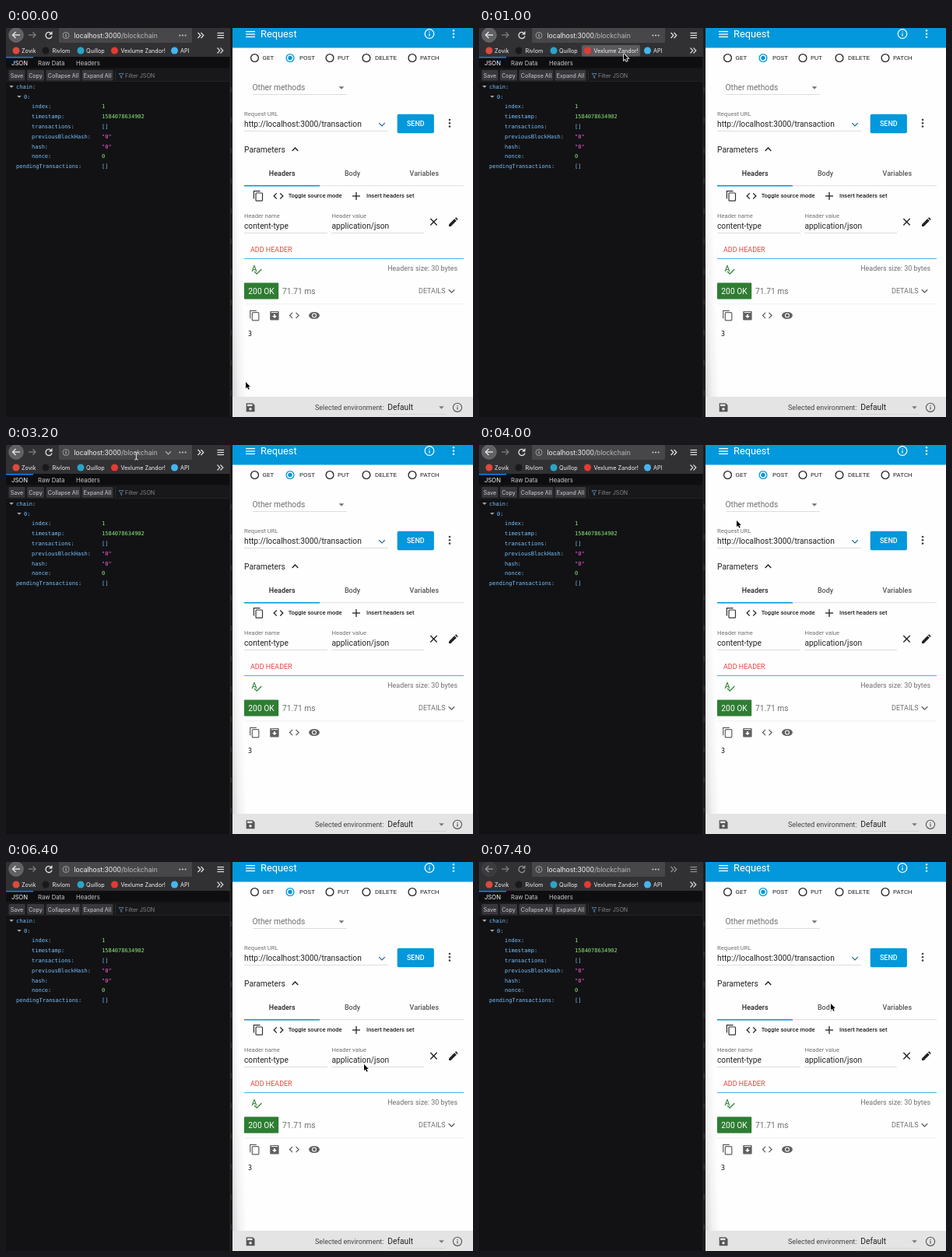
Animation of 600x500 px, one loop 8 s. Source, as an HTML page with a canvas:

```html
<!DOCTYPE html>
<html lang="en">
<head>
<meta charset="utf-8">
<title>Blockchain request</title>
<style>
html, body { margin: 0; width: 100%; height: 100%; overflow: hidden; background: #fff; }
canvas { display: block; width: 600px; height: 500px; }
</style>
</head>
<body>
<canvas id="stage" width="600" height="500"></canvas>
<script>
const ctx = document.getElementById('stage').getContext('2d');
const LOOP = 8000, STEP = 200, FOCUS_SWITCH = 7400;
const UI = 'Inter, sans-serif', APP = 'Roboto, sans-serif', MONO = '"DejaVu Sans Mono", monospace';
const BLUE = '#0298db', INK = '#222222', GREY = '#707070';

// Pointer path: time, x, y
const PATH = [
  [0, 308, 455], [1000, 186, 33], [1400, 180, 26], [2200, 165, 15], [3600, 168, 14],
  [4000, 331, 97], [4800, 470, 140], [5400, 489, 140.5], [6000, 492, 140.5],
  [6400, 460, 260], [6800, 458, 298], [7200, 452, 183], [7400, 452, 182]
];

function rect(x, y, w, h, color, r = 0) {
  ctx.fillStyle = color;
  ctx.beginPath();
  ctx.roundRect(x, y, w, h, r);
  ctx.fill();
}

function frame(x, y, w, h, color, lw = 1.2, r = 1) {
  ctx.strokeStyle = color;
  ctx.lineWidth = lw;
  ctx.beginPath();
  ctx.roundRect(x, y, w, h, r);
  ctx.stroke();
}

function trace(points) {
  ctx.beginPath();
  points.forEach(([x, y], i) => i ? ctx.lineTo(x, y) : ctx.moveTo(x, y));
}

function line(points, color, lw = 1.2) {
  trace(points);
  ctx.strokeStyle = color;
  ctx.lineWidth = lw;
  ctx.stroke();
}

function shape(points, color) {
  trace(points);
  ctx.closePath();
  ctx.fillStyle = color;
  ctx.fill();
}

function disc(x, y, r, color) {
  ctx.fillStyle = color;
  ctx.beginPath();
  ctx.arc(x, y, r, 0, 7);
  ctx.fill();
}

function ring(x, y, r, color, lw = 1.2, from = 0, to = 2 * Math.PI) {
  ctx.strokeStyle = color;
  ctx.lineWidth = lw;
  ctx.beginPath();
  ctx.arc(x, y, r, from, to);
  ctx.stroke();
}

function text(str, x, y, size, color, family = APP, weight = 400, align = 'left') {
  ctx.font = `${weight} ${size}px ${family}`;
  ctx.textAlign = align;
  ctx.fillStyle = color;
  ctx.fillText(str, x, y);
}

const chevron = (x, y, w, h, color, lw) => line([[x - w, y - h], [x, y + h], [x + w, y - h]], color, lw);
const triangle = (x, y, color, s = 3.3) => shape([[x - s, y - s / 2], [x + s, y - s / 2], [x, y + s / 2]], color);

function dots(x, y, dx, dy, r, color) {
  for (let i = -1; i <= 1; i++) disc(x + i * dx, y + i * dy, r, color);
}

function bars(x, y, w, gap, color, lw) {
  for (let i = -1; i <= 1; i++) line([[x, y + i * gap], [x + w, y + i * gap]], color, lw);
}

function doubleChevron(x, y, color) {
  for (const dx of [-3.5, 0.5]) line([[x + dx, y - 3.5], [x + dx + 3.3, y], [x + dx, y + 3.5]], color, 1.2);
}

function infoIcon(x, y, r, color, lw) {
  ring(x, y, r, color, lw);
  rect(x - 0.6, y - r * 0.1, 1.2, r * 0.6, color);
  rect(x - 0.6, y - r * 0.5, 1.2, 1.2, color);
}

function copyIcon(x, y, color) {
  frame(x - 3, y - 4, 8.5, 10.2, color);
  line([[x - 5.6, y + 3.5], [x - 5.6, y - 6.4], [x + 2.5, y - 6.4]], color);
}

function codeIcon(x, y, color) {
  for (const s of [-1, 1]) line([[x + s * 2.2, y - 3.6], [x + s * 5.8, y], [x + s * 2.2, y + 3.6]], color, 1.3);
}

function drawToolbar(focused, overUrl, overBookmark) {
  const icon = focused ? '#e4e4e6' : '#929295';
  rect(0, 0, 288, 37, '#313134');
  disc(13, 9, 9.3, focused ? '#616164' : '#3b3b3e');
  ring(13, 9, 9.3, focused ? '#77777a' : '#4a4a4d', 0.7);
  line([[18, 9], [8.5, 9]], icon, 1.4);
  line([[12.5, 5], [8.5, 9], [12.5, 13]], icon, 1.4);
  line([[29, 9], [38, 9]], '#838386');
  line([[34.5, 5.5], [38, 9], [34.5, 12.5]], '#838386');
  ring(55, 9.5, 4, icon, 1.3, 0.2, 5.3);
  shape([[59.5, 4], [59.5, 8.5], [55, 8.5]], icon);

  rect(68, -3, 171, 22, '#474749', 2);
  infoIcon(77, 9.5, 4, '#b4b4b7', 0.8);
  text('localhost:3000', 87.5, 12.6, 8.55, '#f5f5f6', UI);
  const hostWidth = ctx.measureText('localhost:3000').width;
  text('/blockchain', 87.5 + hostWidth, 12.6, 8.55, '#bcbcbf', UI);
  if (overUrl) chevron(208.5, 10, 3.5, 1.8, '#b8b8bb', 1.2);
  dots(227, 9.5, 3.6, 0, 1.1, '#c4c4c6');
  doubleChevron(250, 9.5, icon);
  bars(271.5, 9.5, 8.5, 3, icon, 1.2);

  if (overBookmark) rect(132, 22, 75, 14.5, '#5b5b5e', 2);
  [
    ['Zovik', 13, 20, '#dc4a3d'], ['Rivlom', 51, 59.5, '#19191b'], ['Quillop', 96, 103, '#2aa5c8'],
    ['Vexlume Zandor!', 139.5, 147.5, '#e53a32'], ['API', 216.5, 224, '#45b5ee']
  ].forEach(([label, iconX, x, color]) => {
    disc(iconX, 29, 4.5, color);
    text(label, x, 31.8, 7.2, '#f4f4f5', UI);
  });
  doubleChevron(275, 29, '#d8d8da');
}

function drawViewer() {
  rect(0, 37, 288, 463, '#121214');
  rect(0, 37, 288, 14.5, '#0e0e10');
  rect(0, 37, 35, 1.4, '#0a84ff');
  text('JSON', 7, 47.6, 7.7, '#ffffff', UI);
  text('Raw Data', 41, 47.6, 7.7, '#c9c9cc', UI);
  text('Headers', 90, 47.6, 7.7, '#c9c9cc', UI);

  rect(0, 51.5, 288, 17, '#18181a');
  rect(0, 68, 288, 0.7, '#29292c');
  [['Save', 3.5, 21], ['Copy', 27, 22], ['Collapse All', 51.5, 44], ['Expand All', 97.5, 40]].forEach(([label, x, w]) => {
    rect(x, 54, w, 13.5, '#38383c', 1);
    text(label, x + w / 2, 63.9, 7.1, '#d0d0d3', UI, 400, 'center');
  });
  rect(140, 54, 0.7, 13, '#36363a');
  line([[145, 58.5], [151, 58.5], [148.7, 61.3], [148.7, 64.5], [147.3, 63.6], [147.3, 61.3], [145, 58.5]], '#5c87ad', 0.8);
  text('Filter JSON', 153, 63.9, 7.1, '#87878b', UI);

  const key = '#78c2ff', green = '#8cec78', pink = '#ff5fe5';
  [
    ['chain:', 13], ['0:', 23], ['index:', 33, '1', green], ['timestamp:', 33, '1584078634902', green],
    ['transactions:', 33, '[]', key], ['previousBlockHash:', 33, '"0"', pink], ['hash:', 33, '"0"', pink],
    ['nonce:', 33, '0', green], ['pendingTransactions:', 13, '[]', key]
  ].forEach(([name, x, value, color], row) => {
    const y = 77.7 + row * 12.82;
    text(name, x, y, 7, key, MONO);
    if (value) text(value, 123, y, 7, color, MONO);
    else triangle(x - 6, y - 2.2, '#a4a4a7', 2.8);
  });

  rect(287, 0, 4, 500, '#1d1d1f');
  for (let y = 76; y < 480; y += 39) rect(288.5, y, 1.5, 7, '#353539');
}

// Shade along the pane's left edge, widening downwards
function drawEdgeShade() {
  const shade = ctx.createLinearGradient(291, 500, 311, 499.2);
  shade.addColorStop(0, 'rgba(0,0,0,0.17)');
  shade.addColorStop(0.5, 'rgba(0,0,0,0.05)');
  shade.addColorStop(1, 'rgba(0,0,0,0)');
  rect(291, 25.5, 24, 448.5, shade);
}

function drawRequest() {
  rect(291, 0, 309, 500, '#fefefe');
  drawEdgeShade();
  rect(291, 0, 309, 25.5, BLUE);
  bars(308, 8, 12, 3.4, '#fff', 1.3);
  text('Request', 327, 12.4, 12.8, '#fff', APP);
  infoIcon(544, 7.5, 5.8, '#fff', 1.2);
  dots(575, 7.5, 0, 4.2, 1.2, '#fff');

  [['GET', 319.5], ['POST', 365], ['PUT', 416], ['DELETE', 463], ['PATCH', 522]].forEach(([label, x]) => {
    const on = label === 'POST';
    ring(x, 38.5, 4.9, on ? BLUE : INK, 1.3);
    if (on) disc(x, 38.5, 2.7, BLUE);
    text(label, x + (on ? 12 : label === 'DELETE' ? 11 : 10), 41.2, 8, INK);
  });

  text('Other methods', 316.5, 80, 10.24, GREY);
  triangle(431, 77, GREY);
  rect(317, 85, 121, 0.8, '#d2d2d2');
  text('Request URL', 306, 113.3, 7.68, GREY);
  text('http://localhost:3000/transaction', 306, 127.4, 10.24, INK);
  chevron(483, 124, 3.8, 1.9, '#246d91', 1.3);
  rect(306, 132, 185, 0.8, '#d2d2d2');
  rect(502.7, 110.7, 47.2, 24.6, BLUE, 2);
  text('SEND', 526.3, 126.2, 8.96, '#fff', APP, 500, 'center');
  dots(570, 122.3, 0, 4.3, 1.3, '#444');

  text('Parameters', 306, 159.6, 10.24, INK);
  chevron(371.5, 156, 3.8, -1.9, INK, 1.4);
  text('Headers', 354.7, 190.3, 8.96, INK, APP, 500, 'center');
  text('Body', 445, 190.3, 8.96, '#555', APP, 500, 'center');
  text('Variables', 537.3, 190.3, 8.96, '#555', APP, 500, 'center');
  rect(306, 202, 282, 1.2, '#e2e4e5');
  rect(306, 202, 97, 1.5, BLUE);

  copyIcon(324, 216, '#333');
  codeIcon(350, 216, '#222');
  text('Toggle source mode', 362.7, 218.4, 7.6, INK, APP, 500);
  line([[445, 216], [455, 216]], INK, 1.3);
  line([[450, 211], [450, 221]], INK, 1.3);
  text('Insert headers set', 463, 218.4, 7.6, INK, APP, 500);

  text('Header name', 306, 243.8, 7.68, GREY);
  text('content-type', 306, 258, 10.24, INK);
  rect(306, 263, 107, 0.8, '#d2d2d2');
  text('Header value', 418.5, 243.8, 7.68, GREY);
  text('application/json', 418.5, 258, 10.24, INK);
  rect(418, 263, 119, 0.8, '#d2d2d2');
  for (const s of [-1, 1]) line([[545.3, 249.2 - s * 4.2], [553.7, 249.2 + s * 4.2]], INK, 1.4);
  shape([[569, 255], [569, 252.4], [576.2, 245.2], [578.8, 247.8], [571.6, 255]], INK);
  shape([[576.9, 244.5], [578.2, 243.3], [580.8, 245.9], [579.5, 247.1]], INK);

  text('ADD HEADER', 314, 288, 8.96, '#e5433c');
  rect(306, 296, 282, 1, '#45b2e4');
  text('A', 315.5, 312.5, 10.5, '#3d8a43', APP, 500);
  line([[319, 313], [322.3, 316], [328.3, 310]], '#3d8a43', 1.4);
  text('Headers size: 30 bytes', 580, 312.2, 8.96, GREY, APP, 400, 'right');

  rect(306, 327.6, 44.2, 20.8, '#2e7d32', 1);
  text('200 OK', 328, 341.6, 10.24, '#fff', APP, 400, 'center');
  text('71.71 ms', 355, 341.6, 10.24, GREY);
  text('DETAILS', 530, 341.2, 8.96, GREY);
  chevron(572.5, 338.2, 3.8, 1.9, '#666', 1.4);
  rect(306, 354.5, 282, 0.7, '#e9e9e9');

  const tool = '#606060';
  copyIcon(319.3, 369.7, tool);
  rect(339.2, 364, 11.4, 11.4, tool, 1);
  rect(340.7, 365.1, 8.4, 1, '#fff');
  shape([[344, 368], [346, 368], [346, 370], [348, 370], [345, 373], [342, 370], [344, 370]], '#fff');
  codeIcon(370.3, 369.5, tool);
  ctx.fillStyle = tool;
  ctx.beginPath();
  ctx.ellipse(396, 369.5, 6.9, 4.6, 0, 0, 7);
  ctx.fill();
  disc(396, 369.5, 3, '#fff');
  disc(396, 369.5, 1.9, tool);
  text('3', 311, 396, 8.3, '#111', MONO);

  rect(291, 474, 309, 26, '#e4e4e4');
  shape([[308.7, 482.3], [317, 482.3], [319.5, 484.8], [319.5, 493.2], [308.7, 493.2]], '#555');
  rect(310, 483.6, 6.5, 2.5, '#e4e4e4');
  disc(314, 489.7, 1.8, '#e4e4e4');
  text('Selected environment:', 397, 491, 8.96, '#444');
  text('Default', 490.3, 490.6, 10.24, INK);
  triangle(559.5, 488, '#7a7a7a');
  rect(490, 496, 75, 0.7, '#cfcfcf');
  infoIcon(580, 487.8, 5.6, '#555', 1.1);
}

function pointerAt(time) {
  const next = PATH.findIndex(p => p[0] > time);
  if (next < 0) return PATH[PATH.length - 1].slice(1);
  const [t0, x0, y0] = PATH[next - 1], [t1, x1, y1] = PATH[next];
  const u = (time - t0) / (t1 - t0), ease = u * u * (3 - 2 * u);
  return [x0 + (x1 - x0) * ease, y0 + (y1 - y0) * ease];
}

function drawPointer(x, y, beam) {
  if (beam) {
    line([[x, y - 4], [x, y + 4]], '#eeeeee', 1);
    for (const s of [-1, 1]) line([[x - 2.2, y + s * 5], [x, y + s * 4], [x + 2.2, y + s * 5]], '#eeeeee', 1);
    return;
  }
  const size = 0.9;
  const arrow = [[0, 0], [0, 9.2], [2.1, 7.3], [3.7, 10.8], [5.2, 10.1], [3.7, 6.8], [6.5, 6.6]]
    .map(([dx, dy]) => [x + dx * size, y + dy * size]);
  line([...arrow, arrow[0]], '#ffffff', 1.6);
  shape(arrow, '#000000');
}

function draw(now) {
  const time = Math.floor(now % LOOP / STEP) * STEP;
  const [x, y] = pointerAt(time);
  const overUrl = x > 68 && x < 239 && y < 19;
  const overBookmark = x > 132 && x < 207 && y > 21 && y < 37;
  drawViewer();
  drawToolbar(time < FOCUS_SWITCH, overUrl, overBookmark);
  drawRequest();
  drawPointer(x, y, overUrl);
}

const start = performance.now();
function tick() {
  draw(performance.now() - start);
  requestAnimationFrame(tick);
}
tick();
</script>
</body>
</html>
```
